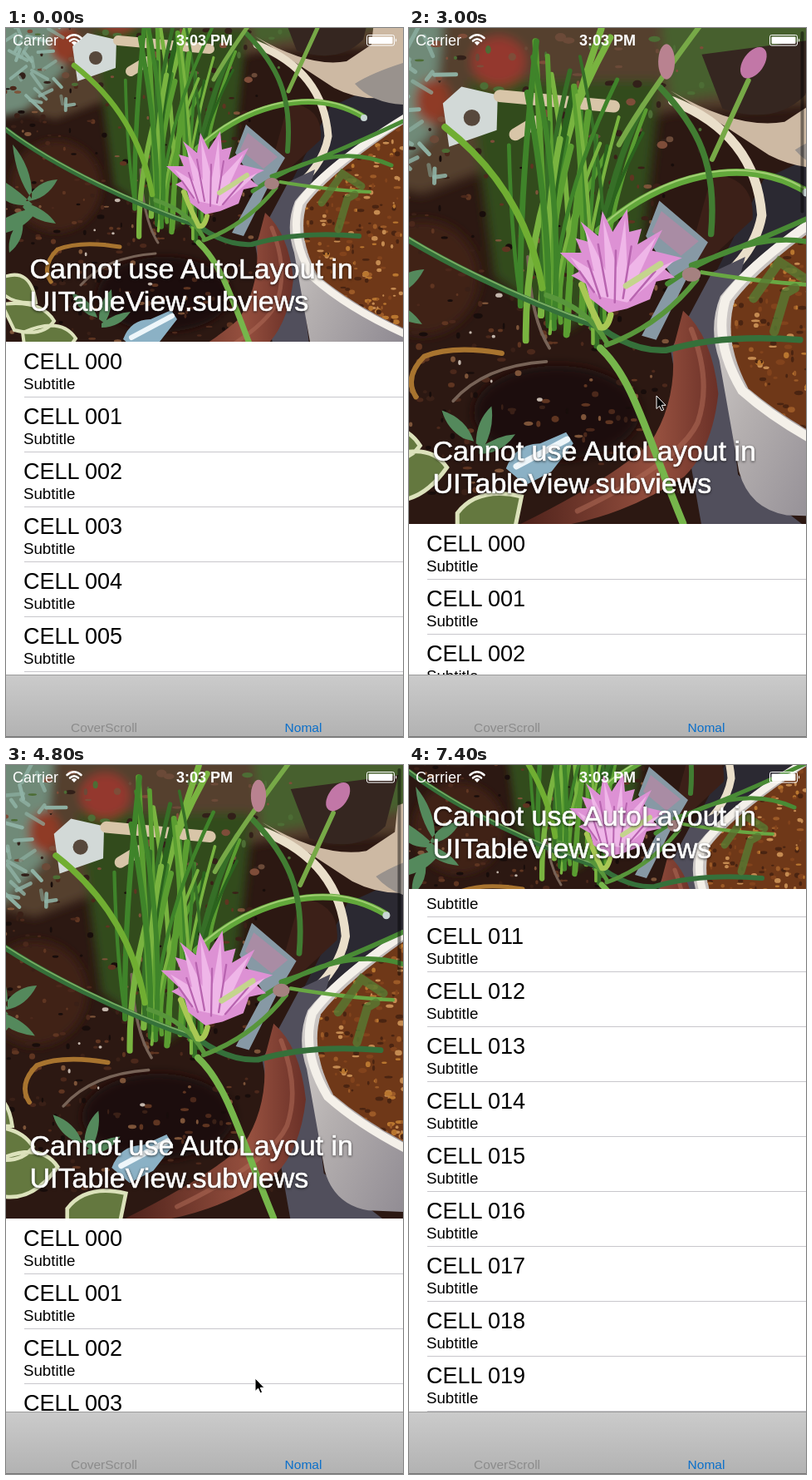
Write an HTML page that moves like this. It is 478 by 852 pixels and loops after 7.6 s.

```html
<!DOCTYPE html>
<html lang="en">
<head>
<meta charset="utf-8">
<title>Stretching cover</title>
<style>
html, body { margin: 0; width: 100%; height: 100%; overflow: hidden; background: #fff; }
#stage { display: block; width: 100vw; height: 100vh; font-family: "Liberation Sans", Arial, sans-serif; }
.line { fill: none; stroke-linecap: round; }
.title { font-size: 34px; fill: #fff; stroke: #fff; stroke-width: .6px; filter: drop-shadow(0 1.5px 1.5px rgba(0,0,0,.7)); }
.name { font-size: 27px; }
.sub { font-size: 18.7px; }
.tab { font-size: 15.5px; text-anchor: middle; }
</style>
</head>
<body>
<svg id="stage" viewBox="0 0 478 852">
  <defs>
    <linearGradient id="barFill" x2="0" y2="1">
      <stop stop-color="#cbcbcb"/><stop offset="1" stop-color="#b2b2b2"/>
    </linearGradient>
    <linearGradient id="clay" x2="1">
      <stop stop-color="#4b2019"/><stop offset=".7" stop-color="#96503f"/><stop offset="1" stop-color="#6a3027"/>
    </linearGradient>
    <linearGradient id="planter" x2="1" y2="1">
      <stop stop-color="#e4e0dc"/><stop offset=".45" stop-color="#b5b0b0"/><stop offset="1" stop-color="#85808a"/>
    </linearGradient>
    <filter id="soft" x="-30%" y="-30%" width="160%" height="160%"><feGaussianBlur stdDeviation="5"/></filter>
    <clipPath id="bed"><path d="M490 108Q394 170 362 212Q350 250 375 297Q420 335 490 366Z"/></clipPath>
  </defs>
  <rect width="478" height="852" fill="#fff"/>
  <g id="cells"></g>

  <svg id="cover" width="478" height="377" viewBox="0 0 478 478" preserveAspectRatio="xMidYMid slice">
    <rect width="478" height="478" fill="#2c1812"/>
    <g transform="translate(0 50.5)">
      <g filter="url(#soft)">
        <path d="M-20-60H500V20L300 30 190 60 60 110-20 90Z" fill="#55412f"/>
        <path d="M-20-60H80L70 50 20 100-20 110Z" fill="#708a78"/>
        <path d="M105 0H290L270 190 200 240 130 190Z" fill="#314c1b"/>
        <path d="M290-60H490V-10L300 20Z" fill="#46602f"/>
        <ellipse cx="70" cy="20" rx="17" ry="22" fill="#8f3b25"/>
        <ellipse cx="134" cy="-18" rx="26" ry="24" fill="#94382e"/>
        <ellipse cx="60" cy="190" rx="55" ry="55" fill="#3f2015"/>
        <ellipse cx="190" cy="320" rx="80" ry="45" fill="#1e100d"/>
      </g>
      <g id="soil"></g>

      <!-- white tag and distant pots -->
      <path d="M80 22L98 6 133 14 132 48 86 64Z" fill="#d2d9d7"/>
      <circle cx="108" cy="36" r="8" fill="#57483c"/>
      <path d="M135 15L245 25 M150 52L170 40" class="line" stroke="#d8c5a8" stroke-width="12"/>
      <path d="M390 95L478 55V130L380 190 330 240 310 250Z" fill="#2b2932"/>
      <path d="M300 10Q365 48 410 40L440 20 443-8 490-25V75Q440 95 395 72Z" fill="#cdb9a3"/>
      <path d="M330-25L444-40 430 14Q400 44 350 27Z" fill="#352620"/>
      <path d="M420 67Q440 54 478 42V92Q440 90 420 67Z" fill="#99928d"/>
      <path d="M302 20Q382 52 388 130Q381 170 338 200" class="line" stroke="#eadfca" stroke-width="9"/>
      <path d="M340 90Q382 94 379 134L340 170 315 180Z" fill="#3c2018"/>

      <!-- planters -->
      <path d="M300 260L340 185 372 170 350 250 365 380 430 430H330Z" fill="#514f5c"/>
      <path d="M490 98Q386 160 348 208Q336 238 347 270L366 377Q376 413 412 419L490 422Z" fill="url(#planter)"/>
      <path d="M490 108Q394 170 362 212Q350 250 375 297Q420 335 490 366Z" fill="#6f3818"/>
      <g id="grit" clip-path="url(#bed)"></g>
      <path d="M490 102Q386 165 353 211Q341 252 369 299Q414 339 490 372" class="line" stroke="#f4f0e9" stroke-width="9"/>
      <path d="M312 222Q340 246 346 302Q340 356 313 382Q255 420 190 430H150Q240 386 280 350Q306 310 302 260Z" fill="url(#clay)"/>
      <path d="M320 240Q340 290 326 330Q308 368 210 415" class="line" stroke="#b06b57" stroke-width="5" opacity=".55"/>
      <path d="M289 116L336 156 316 190 286 250 272 246 302 190 276 150Z" fill="#8799a5"/>
      <path d="M291 126L327 155 310 169 282 146Z" fill="#a98ca4"/>

      <!-- debris -->
      <path d="M54 305Q42 286 62 266Q90 255 137 263" class="line" stroke="#a8742f" stroke-width="5"/>
      <path d="M90 309Q120 275 180 271M162 170Q165 230 183 258" class="line" stroke="#776357" stroke-width="3"/>
      <path d="M141 374Q150 350 174 350L199 339 206 350 185 377 160 390Z" fill="#8bb1c5"/>
      <path d="M151 372L200 346" class="line" stroke="#eef6fa" stroke-width="6"/>

      <!-- low leaves -->
      <g fill="#54895c">
        <path d="M8 140Q33 170 31 205Q12 180 8 140M62 182Q37 183 24 208Q49 207 62 182M0 186Q16 196 32 212Q6 216-5 203M24 210Q49 218 60 235Q32 232 20 215M0 228Q24 215 38 218Q26 239 0 246M4 270Q1 245 20 230Q23 255 4 270"/>
        <path d="M100 345Q84 336 79 318Q103 326 110 348M112 350Q112 328 127 314Q130 335 119 355M115 355Q132 342 150 341Q137 360 115 360"/>
      </g>
      <g fill="#64783f" stroke="#dce2bb" stroke-width="4">
        <path d="M-5 300Q30 286 36 330Q8 332-5 318ZM-5 332Q42 326 58 352Q44 372 10 363ZM20 366Q66 346 84 373Q58 410 25 404ZM94 417Q114 391 156 401L150 430H94Z"/>
      </g>
      <g class="line" id="fronds" stroke="#8fb2a5" stroke-width="4"></g>

      <!-- grass -->
      <g class="line" id="grass"></g>
      <g class="line">
        <path d="M0 122C60 168 160 214 232 238Q265 262 296 260Q350 244 425 250" stroke="#35703a" stroke-width="6"/>
        <path d="M0 120C60 166 160 212 232 236" stroke="#7aae63" stroke-width="1.5"/>
        <path d="M82 45Q159 105 176 200" stroke="#70ae32" stroke-width="6.5"/>
        <path d="M230 145C290 92 370 70 431 107" stroke="#62a83b" stroke-width="7"/>
        <path d="M235 139C290 90 370 69 429 104" stroke="#a0ce71" stroke-width="1.8"/>
        <path d="M290 7C326 45 345 80 339 148" stroke="#417d32" stroke-width="6"/>
        <path d="M297 196Q390 132 464 165M320 178Q380 158 478 112" stroke="#498b35" stroke-width="5"/>
        <path d="M330 185Q390 195 438 197" stroke="#68a743" stroke-width="4"/>
        <path d="M238 255Q290 236 325 192M180 207Q220 220 238 252" stroke="#58963b" stroke-width="5"/>
        <path d="M232 258C264 288 276 340 312 427" stroke="#76b64b" stroke-width="7"/>
        <path d="M380 210L405 175 428 190M400 242L411 205 420 200" stroke="#587b32" stroke-width="9" opacity=".8"/>
        <path d="M340 76L375 0M250 62Q270 25 330-55" stroke="#77a947" stroke-width="5"/>
        <path d="M214 197Q222 218 232 238Q239 240 242 226" stroke="#a8c854" stroke-width="6"/>
      </g>
      <circle cx="431" cy="108" r="4" fill="#c9d6d5"/>
      <ellipse cx="320" cy="187" rx="9" ry="7" fill="#a58180"/>
      <ellipse cx="380" cy="-17" rx="10" ry="17" transform="rotate(35 380 -17)" fill="#c277a7"/>
      <ellipse cx="296" cy="-18" rx="8" ry="17" fill="#b98290"/>

      <!-- blossom -->
      <path d="M240 224L222 210 218 196 204 188 212 184 193 166 214 166 208 152 222 156 213 136 230 150 234 126 244 146 258 124 260 146 272 143 268 158 292 144 282 164 311 171 292 180 304 190 286 194 280 211 258 220Z" fill="#dd91d4"/>
      <path d="M230 208L203 170 226 184 217 143 237 183 235 134 248 180 256 133 258 181 286 151 268 190 303 174 275 200 258 214Z" fill="#efb6e8"/>
      <path d="M232 210L220 174M239 208L230 158M246 214L247 164M254 210L262 160M261 212L285 184M226 204L212 184" class="line" stroke="#b864b0" stroke-width="2"/>
      <path d="M257 198Q275 187 290 177" class="line" stroke="#c4d48d" stroke-width="6"/>
    </g>
  </svg>

  <g id="title" class="title">
    <text x="28.5" y="-76">Cannot use AutoLayout in</text>
    <text x="28.5" y="-37">UITableView.subviews</text>
  </g>
  <rect id="thumb" x="471.5" width="4" rx="2" fill="#000" fill-opacity=".45"/>

  <rect y="777" width="478" height="75" fill="url(#barFill)"/>
  <path d="M0 777.5H478" stroke="#9b9b9b"/>
  <path d="M0 851.5H478" stroke="#777"/>
  <text class="tab" x="118" y="846" fill="#8b8b8b">CoverScroll</text>
  <text class="tab" x="358" y="846" fill="#0a6fca">Nomal</text>

  <g fill="#fff" font-size="18">
    <text x="8" y="21">Carrier</text>
    <text x="239" y="21" text-anchor="middle" font-weight="bold">3:03 PM</text>
    <g class="line" stroke="#fff" stroke-width="2.6" stroke-linecap="butt">
      <path d="M73.5 12Q82 4.500 90.500 12M77 15.500Q82 11 87 15.500"/>
    </g>
    <path d="M82 21L78.700 17.500Q82 14.700 85.300 17.500Z"/>
    <rect x="434.500" y="8.500" width="33" height="12.500" rx="2" fill="none" stroke="#fff"/>
    <rect x="436.500" y="10.500" width="29" height="8.500" rx="1"/>
    <path d="M469 12.500Q471.500 14.700 469 17Z"/>
  </g>
  <path id="pointer" d="M0 0V15.500L3.600 12.200 6.100 17.800 8.600 16.700 6.200 11.300H11Z" fill="#000" stroke="#fff"/>
</svg>

<script>
const byId = id => document.getElementById(id);
const LOOP = 7600, STEP = 200, REST = 377, PINNED = 149, ROW = 66;

let seed = 11;
const rand = (lo, hi) => {
  seed = (seed * 16807) % 2147483647;
  return lo + (hi - lo) * seed / 2147483647;
};
const pick = list => list[Math.floor(rand(0, list.length))];

function add(parent, tag, attrs, text) {
  const el = document.createElementNS("http://www.w3.org/2000/svg", tag);
  for (const key in attrs) el.setAttribute(key, attrs[key]);
  if (text) el.textContent = text;
  byId(parent).append(el);
}

function scatter(parent, count, [x0, x1, y0, y1], colors, size) {
  for (let i = 0; i < count; i++) {
    add(parent, "ellipse", {
      cx: rand(x0, x1), cy: rand(y0, y1),
      rx: rand(1, size), ry: rand(1, size * .7), fill: pick(colors)
    });
  }
}

scatter("soil", 300, [0, 310, 70, 400], ["#4b281b", "#5f3521", "#180d0b", "#3a2017", "#7d5439"], 4.5);
scatter("soil", 90, [0, 330, -45, 70], ["#6b4a38", "#4d6d35", "#322019", "#7e4d39"], 6);
scatter("soil", 8, [10, 200, 200, 310], ["#c3b6ac"], 3.5);
scatter("grit", 330, [350, 478, 110, 365], ["#9c5a27", "#b9762f", "#4a2411", "#82431c", "#c58b51"], 4.5);

for (let i = 0; i < 38; i++) {
  const x = rand(0, 75), y = rand(-45, 105);
  add("fronds", "path", { d: `M${x} ${y}l${rand(-22, 22)} ${rand(-20, 14)}`, opacity: rand(.5, 1) });
}

// Blades fan upward from the clump around the flower stem.
for (let i = 0; i < 30; i++) {
  const x = rand(145, 240), spread = rand(-.35, .75);
  const top = rand(-55, 70), rise = 235 - top;
  add("grass", "path", {
    d: `M${x} ${rand(215, 260)}Q${x + rand(-12, 8)} ${top + rise * .55} ${x + spread * rise * .4} ${top}`,
    stroke: pick(["#2b631e", "#3f842a", "#5a9e31", "#79b440", "#366f27"]),
    "stroke-width": rand(3, 6.5)
  });
}

for (let i = 0; i < 20; i++) {
  const y = i * ROW;
  add("cells", "text", { class: "name", x: 21, y: y + 32.5 }, "CELL " + String(i).padStart(3, "0"));
  add("cells", "text", { class: "sub", x: 21, y: y + 57 }, "Subtitle");
  add("cells", "path", { d: `M22 ${y + 66.5}H478`, stroke: "#c8c7cc" });
}

const scrollKeys = [
  [2000, 0], [2500, -122], [3000, -219], [3500, -287], [4000, -340], [4600, -340],
  [4800, -168], [5000, -60], [5200, -10], [5400, 40], [5600, 120], [5800, 203],
  [6000, 330], [6200, 500], [6400, 670], [6600, 800], [6800, 885], [7000, 918], [7200, 921]
];
const pointerKeys = [
  [1400, 380, 60], [2000, 289, 150], [3000, 298, 442], [4000, 300, 737], [4800, 300, 737],
  [5000, 295, 690], [5200, 287, 600], [5800, 256, 368], [6200, 240, 210]
];

function sample(keys, t) {
  const next = keys.findIndex(k => k[0] > t);
  if (next === 0) return keys[0].slice(1);
  if (next < 0) return keys[keys.length - 1].slice(1);
  const a = keys[next - 1], b = keys[next], p = (t - a[0]) / (b[0] - a[0]);
  return a.slice(1).map((v, i) => v + (b[i + 1] - v) * p);
}

function show(id, visible) {
  byId(id).setAttribute("visibility", visible ? "visible" : "hidden");
}

function draw() {
  const t = Math.floor(performance.now() % LOOP / STEP) * STEP;
  const scroll = Math.round(sample(scrollKeys, t)[0]);
  const height = Math.max(PINNED, REST - scroll);
  byId("cover").setAttribute("height", height);
  byId("title").setAttribute("transform", `translate(0 ${height})`);
  byId("cells").setAttribute("transform", `translate(0 ${REST - scroll})`);

  const top = Math.max(4, .59 * (scroll - REST));
  byId("thumb").setAttribute("y", top);
  byId("thumb").setAttribute("height", Math.min(773, 354 + .6 * scroll) - top);
  show("thumb", t > 2000 && t < 7400);

  byId("pointer").setAttribute("transform", `translate(${sample(pointerKeys, t).join(" ")})`);
  show("pointer", t >= 1400 && t < 7000);
  requestAnimationFrame(draw);
}
draw();
</script>
</body>
</html>
```
